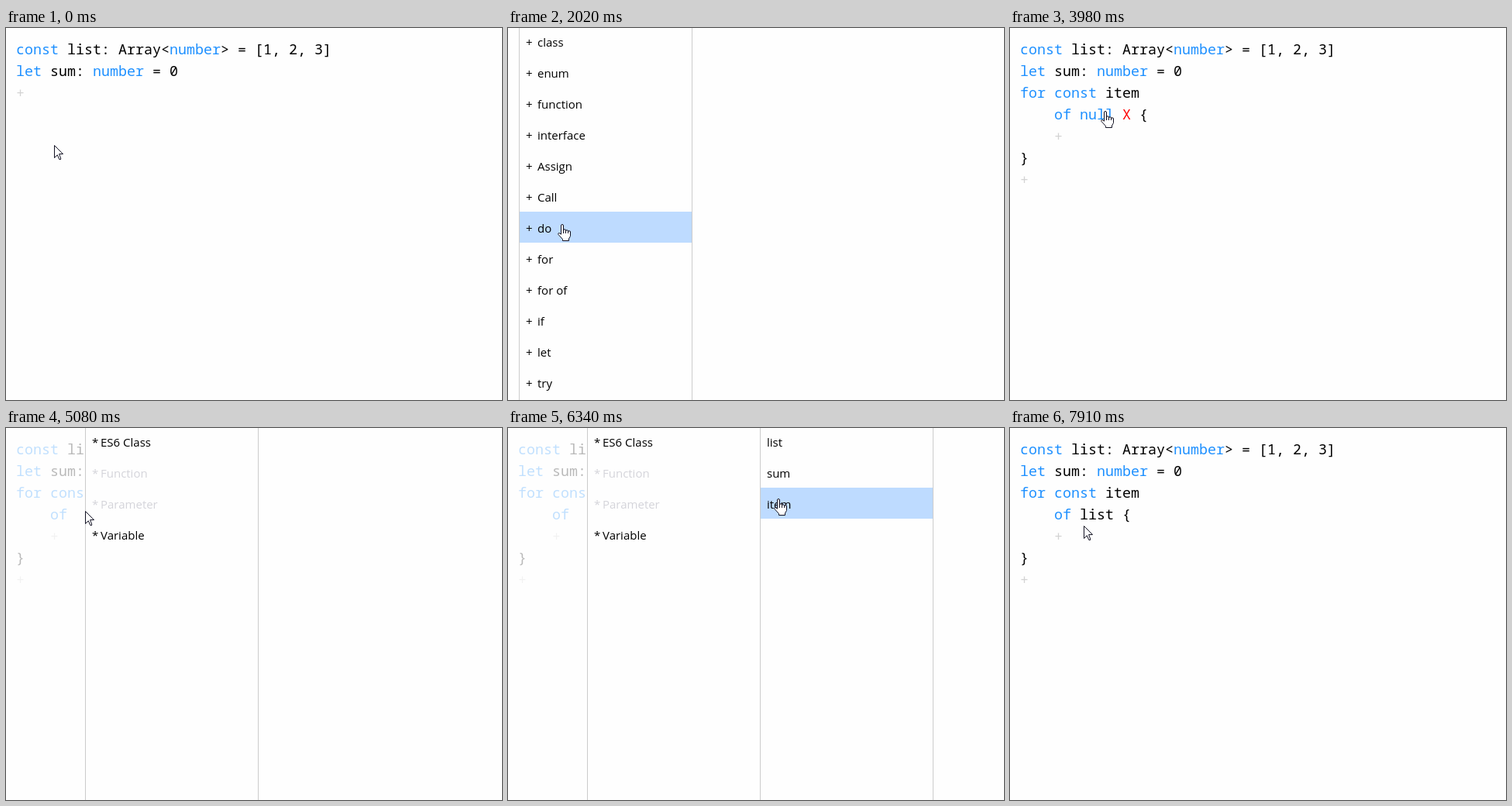
An HTML page with a canvas for the animation above (7990 ms loop, 640 by 480 pixels).

```html
<!DOCTYPE html>
<html lang="en">
<head>
<meta charset="utf-8">
<title>Code editor menu</title>
<style>
html, body { margin: 0; height: 100%; overflow: hidden; background: #fefefe; }
canvas { display: block; }
</style>
</head>
<body>
<canvas id="stage" width="640" height="480"></canvas>
<script>
const ctx = document.getElementById('stage').getContext('2d');
const LOOP = 7990, STEP = 78.5;
const PAPER = '#fefefe';
const LEFT = 13, CHAR = 11, LINE = 28;
const ROW = 40, MENU = 223;

const HEAD = ['const list: Array<number> = [1, 2, 3]', 'let sum: number = 0'];
const loopCode = value => [...HEAD, 'for const item', '    of ' + value, '    +', '}', '+'];

const STATEMENTS = {
  left: 14, mark: '+', indent: 24, disabled: [],
  items: ['class', 'enum', 'function', 'interface', 'Assign', 'Call',
    'do', 'for', 'for of', 'if', 'let', 'try']
};
const KINDS = {
  left: 102, mark: '*', indent: 20, disabled: ['Function', 'Parameter'],
  items: ['ES6 Class', 'Function', 'Parameter', 'Variable']
};
const VARIABLES = {
  left: KINDS.left + MENU, mark: '', indent: 9, disabled: [],
  items: ['list', 'sum', 'item']
};

// Each scene lasts until the next; link is a clickable word in the code,
// click the time from which the click mark shows.
const SCENES = [
  { at: 0, click: 930, code: [...HEAD, '+'], link: { row: 2, col: 0, size: 1 } },
  { at: 1090, click: 2650, code: [], menus: [STATEMENTS] },
  { at: 2730, click: 4450, code: loopCode('null X {'), link: { row: 3, col: 7, size: 4 } },
  { at: 4610, click: 5480, code: loopCode(''), menus: [KINDS] },
  { at: 5630, click: 7130, code: loopCode(''), menus: [KINDS, VARIABLES] },
  { at: 7210, click: LOOP, code: loopCode('list {'), link: { row: 3, col: 7, size: 4 } }
];

// Eased pointer moves, curved towards the point via where there is one.
const MOVES = [
  { start: 0, end: 0, to: [62, 151] },
  { start: 230, end: 700, to: [15, 82] },
  { start: 1780, end: 2490, to: [72, 327], via: [116, 393] },
  { start: 3120, end: 3900, to: [123, 108], via: [275, 75] },
  { start: 3980, end: 4300, to: [104, 107] },
  { start: 5080, end: 5080, to: [102, 107] },
  { start: 5160, end: 5320, to: [129, 135] },
  { start: 6020, end: 6740, to: [386, 23], via: [436, 105] },
  { start: 7290, end: 7910, to: [95, 126], via: [200, 120] }
];

const ARROW = new Path2D('M.5 .5V16.5L4.3 12.8L6.8 18.5H8.6V17L6.6 11.6H11.5Z');
const HAND = new Path2D('M4.5 13V2a1.5 1.5 0 0 1 3 0V8a1.5 1.2 0 0 1 3 0V9' +
  'a1.5 1.2 0 0 1 3 0V10a1.5 1.2 0 0 1 3 0V15.5L14.5 19V21.5H6.5V19.5L1 13.5' +
  'Q.2 11.8 1.8 11.5Q3 11.5 4.5 13.5M7.5 8V12M10.5 9V12M13.5 10V12');

const smooth = u => u * u * (3 - 2 * u);

function pointerAt(t) {
  const index = MOVES.findLastIndex(move => move.start <= t);
  const { start, end, to, via } = MOVES[index];
  const from = index ? MOVES[index - 1].to : to;
  const gaps = Math.round((end - start) / STEP);
  const done = gaps && Math.min(gaps, Math.floor((t - start + 4) * gaps / (end - start)));
  const s = smooth((done + 1) / (gaps + 1));
  return to.map((goal, axis) => {
    const bend = via ? via[axis] : (from[axis] + goal) / 2;
    return Math.round((1 - s) ** 2 * from[axis] + 2 * s * (1 - s) * bend + s * s * goal);
  });
}

function text(str, x, y, color) {
  ctx.fillStyle = color;
  ctx.fillText(str, x, y);
}

function tokenColor(token) {
  if (/^(const|let|number|for|of|null)$/.test(token)) return '#1e90ff';
  return { X: '#f00', '+': '#d3d3d3' }[token] || '#000';
}

function drawCode(lines) {
  ctx.font = '500 18.33px "Noto Sans Mono", monospace';
  lines.forEach((line, row) => {
    for (const { 0: token, index } of line.matchAll(/\w+|[^\w\s]+/g))
      text(token, LEFT + index * CHAR, 34 + row * LINE, tokenColor(token));
  });
}

function drawMenu({ left, mark, indent, items, disabled }, hovered) {
  ctx.fillStyle = PAPER;
  ctx.fillRect(left, 0, 640 - left, 480);
  if (hovered >= 0) {
    ctx.fillStyle = '#bedbff';
    ctx.fillRect(left + 1, hovered * ROW - 3, MENU - 1, ROW);
  }
  ctx.fillStyle = '#ccc';
  ctx.fillRect(left, 0, 1, 480);
  ctx.fillRect(left + MENU, 0, 1, 480);
  ctx.font = '15px "Open Sans", sans-serif';
  items.forEach((name, i) => {
    const color = disabled.includes(name) ? '#d4d4da' : '#000', y = 24 + i * ROW;
    text(mark, left + 9, y, color);
    text(name, left + indent, y, color);
  });
}

function drawPointer(x, y, isHand, clicked) {
  if (clicked) {
    ctx.fillStyle = 'rgba(255, 255, 0, .47)';
    ctx.beginPath();
    ctx.arc(x, y, 12.5, 0, 7);
    ctx.fill();
  }
  const shape = isHand ? HAND : ARROW;
  ctx.save();
  ctx.translate(x - (isHand ? 4 : 0), y - (isHand ? 1 : 0));
  ctx.fillStyle = '#fff';
  ctx.strokeStyle = '#112';
  ctx.fill(shape);
  ctx.stroke(shape);
  ctx.restore();
}

function overLink(x, y, { row, col, size }) {
  const char = (x - LEFT) / CHAR - col, line = (y - LINE / 2) / LINE - row;
  return char >= 0 && char < size && line >= 0 && line < 1;
}

function draw(t) {
  const { click, code, link, menus = [] } = SCENES.findLast(scene => scene.at <= t);
  const [x, y] = pointerAt(t);
  ctx.fillStyle = PAPER;
  ctx.fillRect(0, 0, 640, 480);
  ctx.globalAlpha = menus.length ? .27 : 1;
  drawCode(code);
  ctx.globalAlpha = 1;

  let isHand = !!link && overLink(x, y, link);
  for (const menu of menus) {
    const row = Math.floor((y + 3) / ROW), name = menu.items[row];
    const inside = x > menu.left && x <= menu.left + MENU;
    const active = inside && name && !menu.disabled.includes(name);
    if (active) isHand = true;
    drawMenu(menu, active && x > menu.left + 1 ? row : -1);
  }
  drawPointer(x, y, isHand, t >= click);
}

function tick() {
  draw(performance.now() % LOOP);
  requestAnimationFrame(tick);
}
tick();
</script>
</body>
</html>
```
